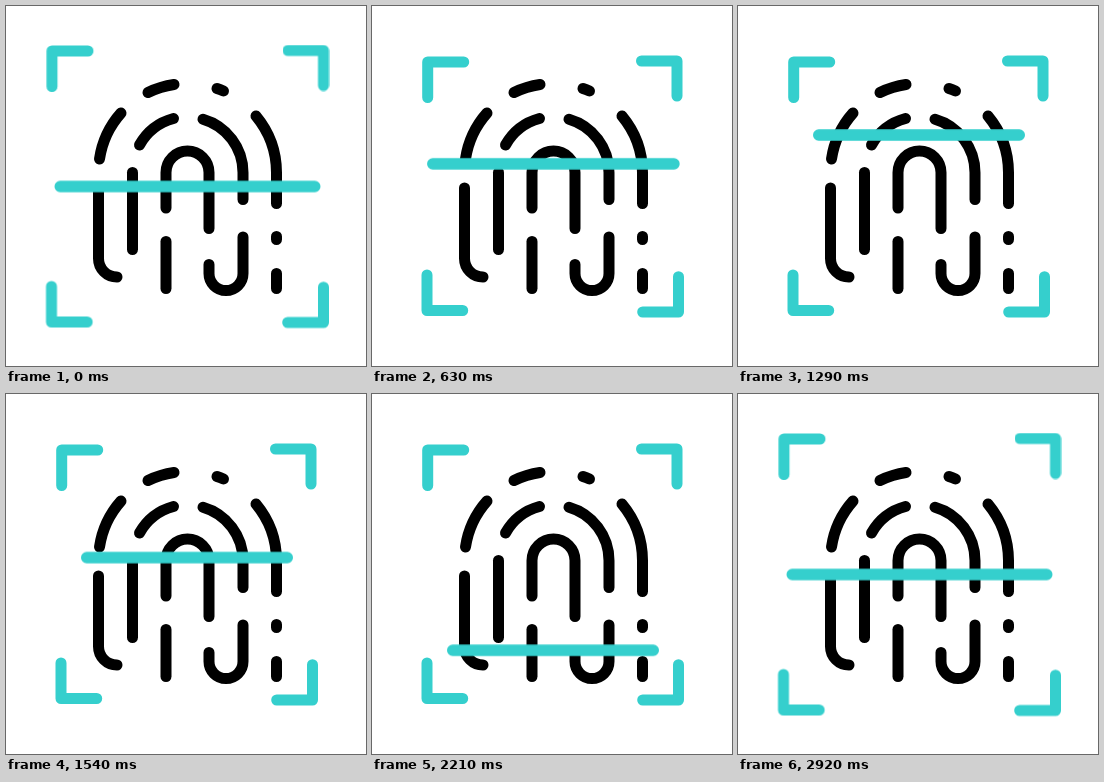
Write an HTML page that moves like this. It is 360 px wide and 360 px high and loops after 3 s.

```html
<!DOCTYPE html>
<html lang="en">
<head>
<meta charset="utf-8">
<title>Fingerprint scan</title>
<style>
  html, body {
    margin: 0;
    width: 100%;
    height: 100%;
    overflow: hidden;
    background: #fff;
  }
  svg {
    display: block;
    width: 100%;
    height: 100%;
  }
  path {
    fill: none;
    stroke-width: 11;
    stroke-linecap: round;
    stroke-linejoin: round;
  }
  .print { stroke: #000; }
  .corner {
    stroke: #35cfcd;
    animation: frame 3s infinite;
  }
  .bar {
    fill: #35cfcd;
    x: 48.5px;
    width: 266px;
    animation: scan 3s linear infinite;
  }

  /* Corners close in, wait for the scan, then open again */
  @keyframes frame {
    0%, 1.333% {
      transform: translate(var(--dx), var(--dy));
      animation-timing-function: cubic-bezier(.4, 0, .6, 1);
    }
    18%, 84.667% {
      transform: none;
      animation-timing-function: cubic-bezier(.5, 0, .5, 1);
    }
    97.333%, 100% { transform: translate(var(--dx), var(--dy)); }
  }

  /* Bar jumps up, sweeps down evenly, returns to the middle */
  @keyframes scan {
    0%, 19.667% {
      x: 48.5px;
      width: 266px;
      transform: translateY(180.5px);
      animation-timing-function: cubic-bezier(.333, .48, .667, 1);
    }
    27.667%, 33.333% {
      x: 75px;
      width: 212px;
      transform: translateY(88.75px);
      animation-timing-function: linear;
    }
    77.667%, 84.667% {
      x: 75px;
      width: 212px;
      transform: translateY(272.75px);
      animation-timing-function: cubic-bezier(.5, 0, .5, 1);
    }
    97.333%, 100% {
      x: 48.5px;
      width: 266px;
      transform: translateY(180.5px);
    }
  }
</style>
</head>
<body>
<svg viewBox="0 0 360 360">
  <g class="print">
    <!-- outer ridge -->
    <path d="M93.5 153A89 89 0 0 1 115 107"/>
    <path d="M142 86.5A89 89 0 0 1 168 78.5"/>
    <path d="M211 82.5A89 89 0 0 1 217.5 85"/>
    <path d="M250 110A89 89 0 0 1 270.5 166.5V197.5"/>
    <path d="M270.5 230.5V233.5M270.5 267.5V282.5"/>
    <path d="M92.5 182V252.5A18.5 18.5 0 0 0 111 271"/>
    <!-- middle ridge -->
    <path d="M133.5 139A55.5 55.5 0 0 1 167.5 112.5"/>
    <path d="M197 113.2A55.5 55.5 0 0 1 237 166.5V193.5"/>
    <path d="M126.5 166.5V243.5"/>
    <path d="M203 258.5V267.5A17 17 0 0 0 237 267.5V231"/>
    <!-- inner ridge -->
    <path d="M160 202V166.5A21.5 21.5 0 0 1 203 166.5V222.5"/>
    <path d="M160 235.5V282.5"/>
  </g>
  <path class="corner" style="--dx:-9.7px;--dy:-11px" d="M55.7 91.5V56H91.7"/>
  <path class="corner" style="--dx:12.5px;--dy:-10.5px" d="M269.5 55H305V90"/>
  <path class="corner" style="--dx:-9.5px;--dy:11.5px" d="M55 269V304.5H90.7"/>
  <path class="corner" style="--dx:11px;--dy:10.5px" d="M270.7 306H306.5V270.7"/>
  <rect class="bar" y="-5.7" height="11.4" rx="5.7"/>
</svg>
</body>
</html>
```
